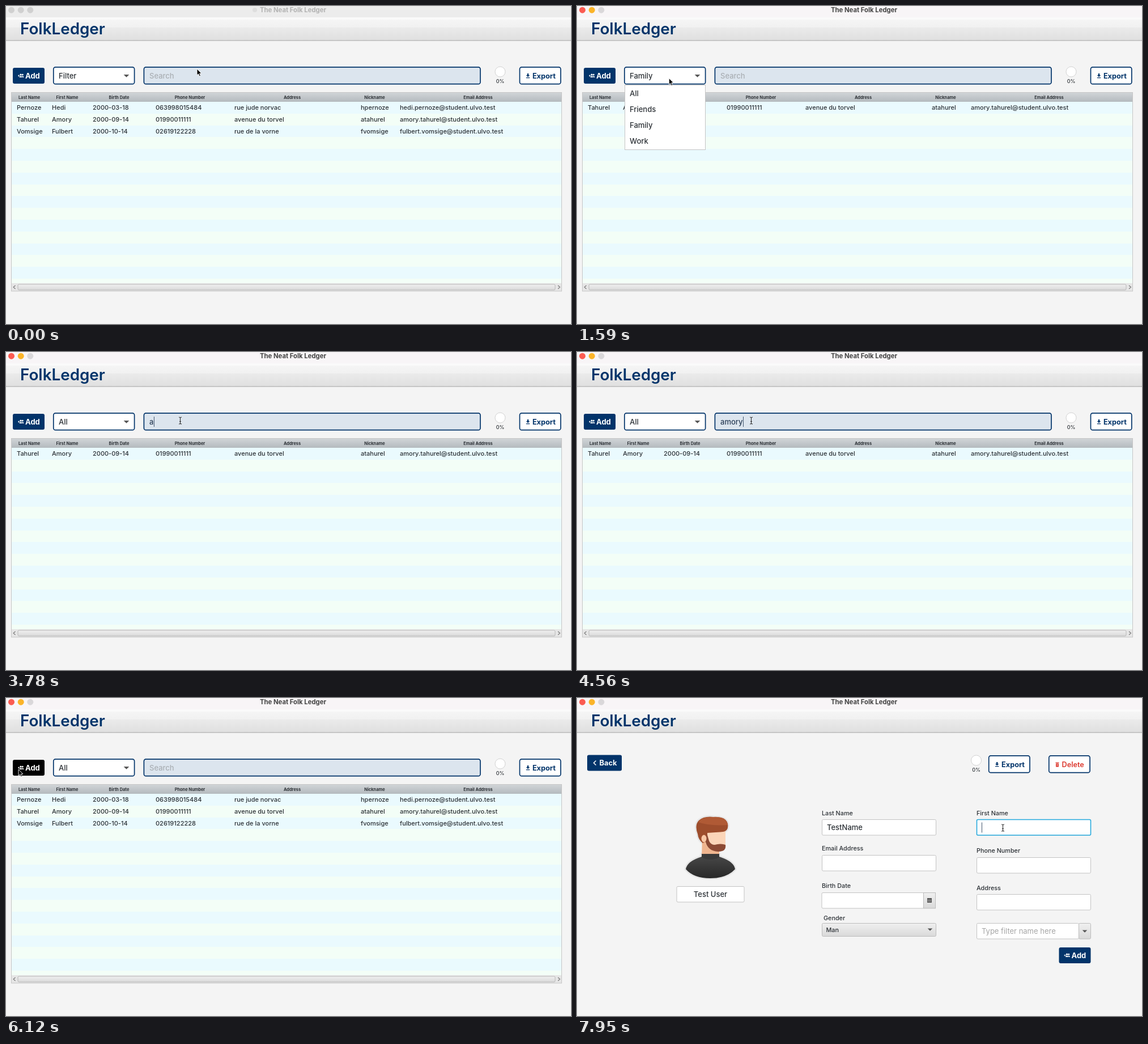
These frames come from a looping animation (997x561 px, 8 s). An HTML page:

```html
<!DOCTYPE html>
<html lang="en">
<head>
<meta charset="utf-8">
<title>Contacts</title>
<style>
  html, body { margin: 0; width: 100%; height: 100%; overflow: hidden; background: #f4f4f4; }
  svg { display: block; width: 100vw; height: 100vh; }
  text { font-family: Inter, "Open Sans", sans-serif; white-space: pre; }
</style>
</head>
<body>
<svg id="stage" viewBox="0 0 997 561">
  <defs>
    <linearGradient id="bar" x2="0" y2="1">
      <stop offset="0" stop-color="#f5f5f5"/><stop offset=".36" stop-color="#f1f1f1"/>
      <stop offset=".38" stop-color="#ebebeb"/><stop offset="1" stop-color="#dfdfdf"/>
    </linearGradient>
    <linearGradient id="head" x2="0" y2="1">
      <stop offset="0" stop-color="#d0d4d7"/><stop offset="1" stop-color="#b4babe"/>
    </linearGradient>
    <linearGradient id="soft" x2="0" y2="1">
      <stop offset="0" stop-color="#f0f0f0"/><stop offset="1" stop-color="#d9d9d9"/>
    </linearGradient>
    <linearGradient id="shirt" x2="0" y2="1">
      <stop offset="0" stop-color="#4a4a4a"/><stop offset="1" stop-color="#282828"/>
    </linearGradient>
  </defs>
</svg>
<script>
const LOOP = 8000, NAVY = '#02346a', INK = '#2c3136', PITCH = 20.8;
const svg = document.getElementById('stage');
const $ = id => document.getElementById(id);

// Markup helpers
const text = (x, y, size, weight, str, fill = INK, extra = '') =>
  `<text x="${x}" y="${y}" font-size="${size}" font-weight="${weight}" fill="${fill}" ${extra}>${str}</text>`;
const MID = 'text-anchor="middle"';
const rect = (x, y, w, h, fill, extra = '') =>
  `<rect x="${x}" y="${y}" width="${w}" height="${h}" fill="${fill}" ${extra}/>`;
const path = (d, fill, extra = '') => `<path d="${d}" fill="${fill}" ${extra}/>`;
const group = (id, body) => `<g id="${id}">${body}</g>`;
const outline = (x, y, w, h, fill = '#fff') =>
  rect(x, y, w, h, fill, `rx="3.5" stroke="${NAVY}" stroke-width="1.7"`);
const triangle = (x, y, s) => path(`M${x - s} ${y}h${2 * s}l${-s} ${s}z`, '#555');

const people = (x, y) => `<g transform="translate(${x} ${y})" fill="#fff">
  <path d="M-5 0h3M-3.5 -1.5v3" stroke="#fff"/><circle cx="0" cy="-1.8" r="1.6"/><circle cx="3.3" cy="-1.8" r="1.4"/>
  <path d="M-2.4 3q0-2.6 2.4-2.6t2.4 2.6zM3 3q0-1.8-.8-2.6q3-.4 3.2 2.6z"/></g>`;
const addButton = (x, y, id) =>
  rect(x, y, 56, 28, NAVY, `rx="3" id="${id}"`) + people(x + 14, y + 14) +
  text(x + 22, y + 18.7, 13, 700, 'Add', '#fff');
const exportButton = (x, y) => outline(x, y, 72.3, 29.8) +
  path(`M${x + 13.3} ${y + 11.1}h2.4v3h2l-3.2 3.2l-3.2 -3.2h2zM${x + 11.3} ${y + 18.1}h6.4v1.3h-6.4z`, NAVY) +
  text(x + 22.4, y + 19.8, 12.7, 700, 'Export', NAVY);
const gauge = (x, y) =>
  `<circle cx="${x}" cy="${y}" r="9" fill="#fff" stroke="#d2d2d2"/>` +
  text(x, y + 20, 9, 500, '0%', INK, MID);

// Contact data; the search looks at both names
const columns = [19, 81, 153, 264, 403, 626, 695];
const headings = [[41, 'Last Name'], [108, 'First Name'], [199.5, 'Birth Date'], [324.5, 'Phone Number'],
  [505, 'Address'], [650.5, 'Nickname'], [833, 'Email Address']];
const contacts = [
  ['Pernoze', 'Hedi', '2000-03-18', '063998015484', 'rue jude norvac'],
  ['Tahurel', 'Amory', '2000-09-14', '01990011111', 'avenue du torvel'],
  ['Vomsige', 'Fulbert', '2000-10-14', '02619122228', 'rue de la vorne']
].map(c => {
  const [last, first] = c.map(s => s.toLowerCase());
  return [...c, first[0] + last, `${first}.${last}@student.ulvo.test`];
});
const choices = ['All', 'Friends', 'Family', 'Work'];

function windowFrame() {
  const lights = [9.5, 26.2, 42.8].map((x, i) => `<circle id="light${i}" cx="${x}" cy="7.2" r="5.5"/>`).join('');
  return rect(0, 0, 997, 561, '#f4f4f4') + rect(0, 0, 997, 20, '#ececec', 'id="titleBar"') +
    rect(0, 20, 997, 4, '#fafafa') + rect(0, 24, 997, 37, 'url(#bar)') +
    rect(0, 60.3, 997, 1.2, '#b0b0b0') + lights +
    '<circle id="badge" cx="439" cy="7" r="4" fill="#dedede"/>' +
    text(506.5, 11, 11.3, 650, 'The Neat Folk Ledger', '#444', MID + ' id="title"') +
    text(25, 50, 27.8, 600, 'FolkLedger', NAVY);
}

function listView() {
  let out = addButton(12, 109, 'addBox') + outline(83.8, 107.9, 142.8, 29.8) +
    text(93, 127.7, 13, 500, '', INK, 'id="choice"') + triangle(212.5, 121, 4.8) +
    outline(243.4, 107.9, 593.6, 29.8, '#dce5ee') +
    text(253, 127.7, 13, 500, 'Search', '#aaafb4', 'id="prompt"') +
    text(253, 127.7, 13, 500, '', '#2b3f58', 'id="query"') +
    gauge(872, 116) + exportButton(906.5, 107.9) +
    rect(9.5, 152.5, 971, 350.5, '#e6e6e6', 'stroke="#c6c6c6"') + rect(10, 153, 970, 16, 'url(#head)');
  headings.forEach(([x, s]) => out += text(x, 163.6, 7.4, 700, s, INK, MID));
  for (let i = 0; i < 16; i++) {
    const y = Math.round(169 + i * PITCH);
    out += rect(10, y, 970, Math.min(21, 489 - y), i % 2 ? '#f3fef7' : '#eafafe');
  }
  contacts.forEach((c, i) => out += group('row' + i,
    c.map((s, k) => text(columns[k], 183, 11, 550, s)).join('')));
  out += rect(21, 491, 948, 10, 'url(#soft)', 'rx="2" stroke="#b8b8b8"') +
    path('M16.5 493l-3.5 3l3.5 3M974 493l3.5 3l-3.5 3', 'none', 'stroke="#777" stroke-width="1.1"');
  const menu = rect(84.5, 139.5, 142, 114, '#fff', 'stroke="#c4c4c4"') +
    rect(85, 140, 141, 28, '#dce5ee', 'id="hover"') +
    choices.map((s, i) => text(93, 158.5 + i * 28, 13, 500, s)).join('');
  return out + group('menu', menu);
}

const fields = {
  nick: [176, 332.5, 119, 27.5], last: [432.5, 214.5, 201, 27.5], mail: [432.5, 277.5, 201, 27.5],
  birth: [432, 343.5, 180, 27.5], first: [705.5, 214.5, 201, 27.5], phone: [705.5, 281.5, 201, 27.5],
  address: [705.5, 346.5, 201, 27.5], tag: [705.5, 397.5, 180, 27.5]
};

function avatar() {
  const body = 'M192 302Q194 288 220 280V275H251V280Q277 288 279 302Q264 318 235 318T192 302Z';
  const hair = 'M213 240Q207 224 215 216Q224 208 241 210Q264 210 266 222Q268 234 258 236L230 238V252L222 256Q214 250 213 240Z';
  return path(body + hair, '#fff', 'stroke="#e6e6e6" stroke-width="5" stroke-linejoin="round"') +
    path('M221 246H251V282Q236 291 220 280Z', '#efb58f') +
    path('M225 234H262V262Q260 270 248 270Q232 270 227 256Z', '#fbd5b8') +
    path(hair, '#9d4d2c') + path('M214 219Q232 226 266 224Q265 208 239 210Q218 210 214 219Z', '#b05a35') +
    path('M229 238L233 252Q236 259 243 259Q253 256 262 259Q264 271 249 271Q231 270 227 254Z', '#8c4a34') +
    '<ellipse cx="224" cy="248" rx="4.5" ry="6.5" fill="#f8c7a5"/>' +
    path(body, 'url(#shirt)') + path('M220 275H251V281Q235 289 220 281Z', '#3a3a3a');
}

function formView() {
  let out = rect(18, 100.5, 61, 28, NAVY, 'rx="3"') +
    path('M33.5 110.5l-4 4l4 4', 'none', 'stroke="#fff" stroke-width="1.5"') +
    text(39.5, 119.2, 12.8, 700, 'Back', '#fff') +
    gauge(704.5, 110) + exportButton(726.7, 101.9) + outline(832.8, 101.9, 72.3, 29.8) +
    path('M844.5 113.5h6v1.2h-6zM845 115.5h5v6h-5z', '#dc3a30') +
    path('M846.5 117l2 2.5m0-2.5l-2 2.5', 'none', 'stroke="#fff" stroke-width=".7"') +
    text(855.5, 121.6, 12.7, 600, 'Delete', '#dc3a30') + avatar();
  for (const f of Object.values(fields)) out += rect(...f, '#fff', 'rx="2" stroke="#c3c3c3"');
  out += rect(611.5, 343.5, 21, 27.5, 'url(#soft)', 'stroke="#bcbcbc"') +
    path('M618 353h8v8h-8z', '#555') + path('M619 356.3h6m-6 2.2h6', 'none', 'stroke="#eee" stroke-dasharray="1.2 1"') +
    rect(432.5, 397.5, 201, 23, 'url(#soft)', 'rx="2" stroke="#bcbcbc"') + triangle(623, 406.5, 4.3) +
    text(439.5, 412.7, 10.8, 550, 'Man') +
    rect(885.5, 397.5, 21, 27.5, 'url(#soft)', 'rx="2" stroke="#bcbcbc"') + triangle(896, 409.5, 4.3) +
    text(714, 416.2, 13, 400, 'Type filter name here', '#a6a6a6') + addButton(850.5, 440, 'saveBox');
  [[432, 206.5, 'Last Name'], [432, 269.3, 'Email Address'], [432, 334.5, 'Birth Date'], [435, 392, 'Gender'],
    [705, 206.5, 'First Name'], [705, 273, 'Phone Number'], [705, 338.7, 'Address']]
    .forEach(([x, y, s]) => out += text(x, y, 10.8, 550, s));
  return out + rect(0, 0, 0, 0, '#fff', 'id="focus" rx="2" stroke="#25a9dd" stroke-width="1.6"') +
    text(235.5, 351, 13, 500, '', INK, MID + ' id="nick"') + text(441, 233, 13, 500, '', INK, 'id="last"');
}

const pointer = path('M0 0V11.2L2.6 8.8L4.4 13L6.4 12.1L4.6 8.1H8Z', '#000', 'stroke="#fff" stroke-width=".9"');
const beam = path('M-2.5 -6Q0 -6 0 -4.5Q0 -6 2.5 -6M0 -5V5M-2.5 6Q0 6 0 4.5Q0 6 2.5 6M-1.5 1.5h3', 'none',
  'stroke="#333" stroke-width="1.1"');

svg.insertAdjacentHTML('beforeend', windowFrame() + group('list', listView()) + group('form', formView()) +
  rect(0, 0, 1, 18, '#41566e', 'id="caret"') + group('arrow', pointer) + group('beam', beam));

// Timeline
const track = [[480, 337, 111], [720, 200, 124], [840, 200, 124], [1020, 152, 215], [1260, 152, 215],
  [1440, 165, 124], [1560, 165, 124], [1710, 140, 155], [1800, 140, 155], [2010, 307.5, 121],
  [5400, 307.5, 121], [5940, 22, 126], [6210, 22, 126], [6420, 235, 346], [6990, 235, 346],
  [7170, 500, 229], [7680, 500, 229], [7860, 751.5, 229]];
const ACTIVE = 780, FORM = 6150;
const within = (t, a, b) => t >= a && t < b;

function cursorAt(t) {
  const i = track.findIndex(k => k[0] > t);
  if (i === 0) return track[0].slice(1);
  if (i < 0) return track[track.length - 1].slice(1);
  const [ta, xa, ya] = track[i - 1], [tb, xb, yb] = track[i];
  const p = (t - ta) / (tb - ta), e = p * p * (3 - 2 * p);
  return [xa + (xb - xa) * e, ya + (yb - ya) * e];
}

// Letters appear every `step` ms from `start`, and go again from `erase`
function typed(t, word, start, step, erase = Infinity, back = 90) {
  const count = (from, gap) => Math.max(0, Math.min(word.length, Math.floor((t - from) / gap) + 1));
  return word.slice(0, count(start, step) - (t >= erase ? count(erase, back) : 0));
}

const show = (id, on) => $(id).setAttribute('display', on ? 'inline' : 'none');
const move = (id, x, y) => $(id).setAttribute('transform', `translate(${x} ${y})`);
const put = (id, s) => { if ($(id).textContent !== s) $(id).textContent = s; };
const paint = (id, c) => $(id).setAttribute('fill', c);

function drawWindow(t) {
  const on = t >= ACTIVE;
  paint('titleBar', on ? '#f8f5f7' : '#ececec');
  paint('title', on ? '#434343' : '#b2b2b2');
  ['#fb5b52', '#fbb429', '#dad8da'].forEach((c, i) => paint('light' + i, on ? c : '#d0d0d0'));
  show('badge', !on);
}

function drawList(t, x, y) {
  const choice = t < 1050 ? 'Filter' : t < 1740 ? 'Family' : 'All';
  const query = t < 3700 ? typed(t, 'Hedi', 2190, 130, 3300) : typed(t, 'amory', 3750, 130, 4590);
  const focused = within(t, 2040, 6000);
  put('choice', choice);
  put('query', query);
  show('prompt', !focused);
  const key = query.toLowerCase();
  let n = 0;
  contacts.forEach((c, i) => {
    const hit = (choice !== 'Family' || i === 1) && c.slice(0, 2).some(s => s.toLowerCase().includes(key));
    show('row' + i, hit);
    if (hit) move('row' + i, 0, PITCH * n++);
  });
  const item = Math.floor((y - 140) / 28);
  show('menu', within(t, ACTIVE, 1050) || within(t, 1500, 1740));
  show('hover', item >= 0 && item < 4);
  $('hover').setAttribute('y', 140 + item * 28);
  paint('addBox', x < 68 && within(y, 109, 137) ? '#000' : NAVY);
  const since = t - (query ? t : t > 4950 ? 4950 : 2040);
  return focused && since % 500 < 250 && [253 + $('query').getComputedTextLength() + .5, 114];
}

function drawForm(t) {
  const name = t < 6450 ? '' : t < 7200 ? 'nick' : t < 7830 ? 'last' : 'first';
  put('nick', typed(t, 'Test User', 6510, 50));
  put('last', typed(t, 'TestName', 7230, 55));
  show('focus', name);
  if (!name) return false;
  const [x, y, w, h] = fields[name];
  Object.entries({ x, y, width: w, height: h }).forEach(([k, v]) => $('focus').setAttribute(k, v));
  const len = name === 'first' ? 0 : $(name).getComputedTextLength();
  return [name === 'nick' ? 235.5 + len / 2 : x + 8.5 + len, y + 5];
}

function overInput(t, x, y) {
  if (t < FORM) return within(x, 243, 838) && within(y, 108, 138);
  return Object.values(fields).some(f => within(x, f[0], f[0] + f[2]) && within(y, f[1], f[1] + f[3]));
}

function draw(t) {
  const [x, y] = cursorAt(t), form = t >= FORM;
  drawWindow(t);
  show('list', !form);
  show('form', form);
  const caret = form ? drawForm(t) : drawList(t, x, y);
  show('caret', caret);
  if (caret) move('caret', ...caret);
  const input = t >= ACTIVE && overInput(t, x, y);
  show('beam', input);
  show('arrow', !input);
  move(input ? 'beam' : 'arrow', x, y);
}

const start = performance.now();
function tick() {
  draw((performance.now() - start) % LOOP);
  requestAnimationFrame(tick);
}
tick();
</script>
</body>
</html>
```
